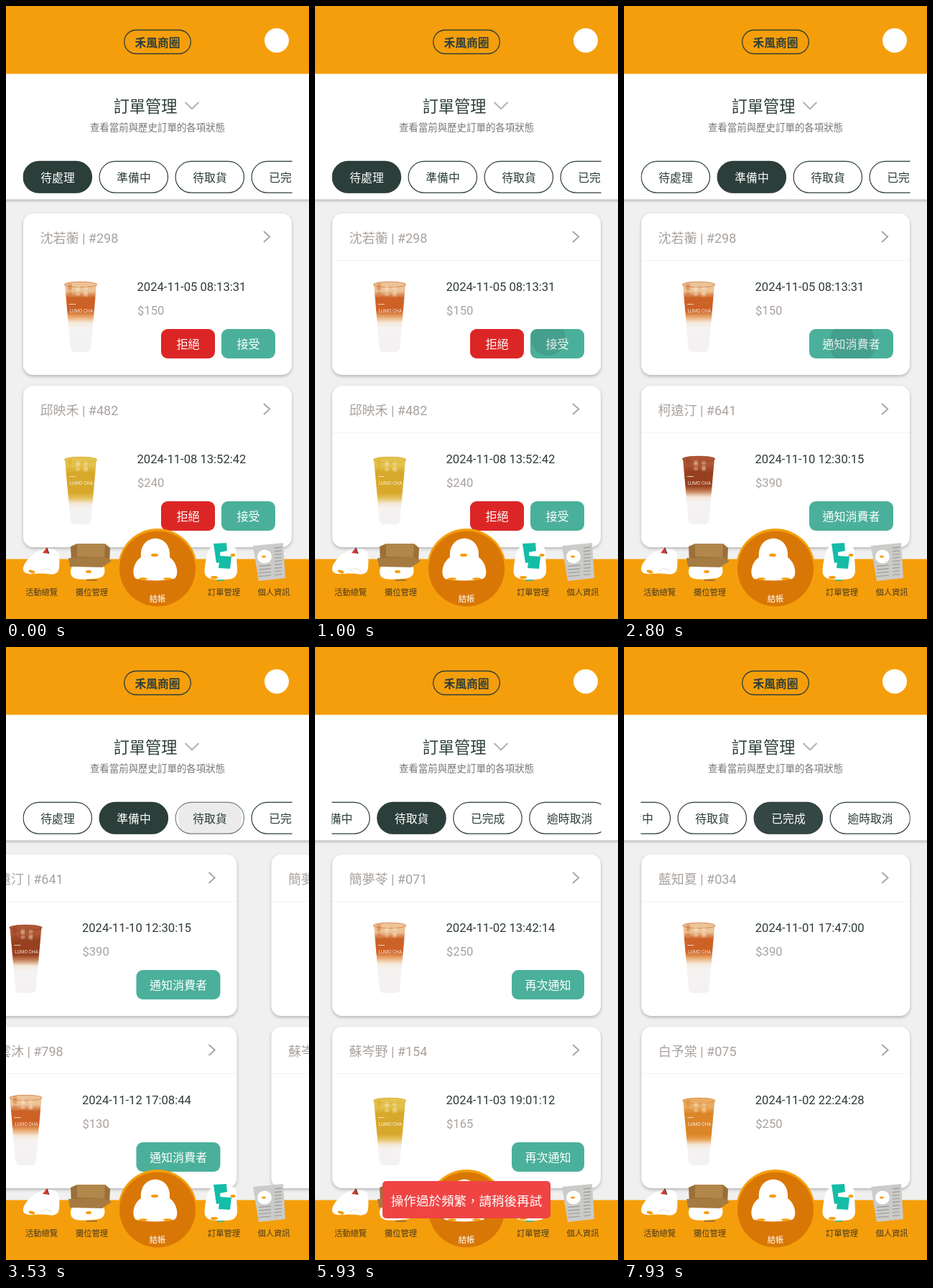
Write an HTML page with a canvas that moves like this. It is 422 px wide and 854 px high and loops after 8 s.

```html
<!DOCTYPE html>
<html lang="zh-Hant">
<head>
<meta charset="utf-8">
<title>訂單管理</title>
<style>
html, body { margin: 0; width: 100%; height: 100%; overflow: hidden; background: #f0f0f0; }
canvas { display: block; width: 422px; height: 854px; }
</style>
</head>
<body>
<canvas id="stage" width="422" height="854"></canvas>
<script>
const ctx = document.getElementById('stage').getContext('2d');
const W = 422, H = 854, LOOP = 8000;
const FONT = 'Roboto, "Noto Sans CJK TC", "Noto Sans CJK JP", "Noto Sans CJK", sans-serif';
const AMBER = '#f59e0b', DEEP = '#d97706', DARK = '#2b3e3a', GREY = '#a8a29e', TEAL = '#4bb09b', RED = '#dc2626';

const TEA = { ice: '#ecc397', tea: '#cd6226', blend: '#e9a468', rim: 388, level: .4 };
const CITRUS = { ice: '#e2c24c', tea: '#d8a82b', blend: '#e4c05a', rim: 392, level: .52 };
const BLACK = { ice: '#ad5636', tea: '#97401f', blend: '#c57f55', rim: 391, level: .42 };
const HONEY = { ice: '#e8ab62', tea: '#db8529', blend: '#e69d4c', rim: 392, level: .52 };

const pages = [
  { swapAt: 1200, buttons: [[216, 75, '拒絕', RED], [300, 75, '接受', TEAL]], cards: [
    ['沈若蘅', '298', '2024-11-05 08:13:31', 150, TEA],
    ['邱映禾', '482', '2024-11-08 13:52:42', 240, CITRUS],
    ['溫岱川', '517', '2024-11-09 10:21:05', 180, HONEY]] },
  { swapAt: 2930, buttons: [[258, 117, '通知消費者', TEAL]], cards: [
    ['沈若蘅', '298', '2024-11-05 08:13:31', 150, TEA],
    ['柯遠汀', '641', '2024-11-10 12:30:15', 390, BLACK],
    ['紀雲沐', '798', '2024-11-12 17:08:44', 130, TEA]] },
  { swapAt: LOOP, buttons: [[274, 101, '再次通知', TEAL]], cards: [
    ['簡夢苓', '071', '2024-11-02 13:42:14', 250, TEA],
    ['蘇岑野', '154', '2024-11-03 19:01:12', 165, CITRUS]] },
  { swapAt: LOOP, buttons: [], cards: [
    ['藍知夏', '034', '2024-11-01 17:47:00', 390, TEA],
    ['白予棠', '075', '2024-11-02 22:24:28', 250, HONEY]] }
];
const taps = [[0, 930, 325, 463], [1, 2690, 318, 470], [2, 4580, 326, 470]];
const slideStarts = [1720, 3494, 7690];
const tabs = [[24, 96, '待處理'], [130, 96, '準備中'], [236, 96, '待取貨'], [342, 96, '已完成'], [448, 112, '逾時取消']];

const clamp = v => Math.max(0, Math.min(1, v));
const ramp = (t, from, to) => clamp((t - from) / (to - from));

// Cubic bezier (.25, .1, .25, 1)
function ease(x) {
  if (x <= 0 || x >= 1) return clamp(x);
  let lo = 0, hi = 1, s = .5;
  for (let i = 0; i < 20; i++) {
    s = (lo + hi) / 2;
    if (.75 * s * (1 - s) + s ** 3 < x) lo = s; else hi = s;
  }
  return .3 * s * (1 - s) ** 2 + 3 * s * s * (1 - s) + s ** 3;
}

function text(str, x, cy, size, color, align = 'left', weight = 400) {
  ctx.font = `${weight} ${size}px ${FONT}`;
  ctx.textAlign = align;
  ctx.fillStyle = color;
  ctx.fillText(str, x, cy + size * .37);
}

function rounded(x, y, w, h, r) {
  ctx.beginPath();
  ctx.roundRect(x, y, w, h, r);
}

function box(x, y, w, h, r, color) {
  rounded(x, y, w, h, r);
  ctx.fillStyle = color;
  ctx.fill();
}

function oval(x, y, rx, ry, color, turn = 0) {
  ctx.beginPath();
  ctx.ellipse(x, y, rx, ry, turn, 0, Math.PI * 2);
  ctx.fillStyle = color;
  ctx.fill();
}

function shape(color, ...points) {
  ctx.beginPath();
  points.forEach(([x, y]) => ctx.lineTo(x, y));
  ctx.fillStyle = color;
  ctx.fill();
}

// Closed outline that rounds every corner
function blob(color, ...points) {
  const mid = ([a, b], [c, d]) => [(a + c) / 2, (b + d) / 2];
  ctx.beginPath();
  ctx.moveTo(...mid(points[points.length - 1], points[0]));
  points.forEach((p, i) => ctx.quadraticCurveTo(...p, ...mid(p, points[(i + 1) % points.length])));
  ctx.fillStyle = color;
  ctx.fill();
}

function line(color, width, ...points) {
  ctx.beginPath();
  points.forEach(([x, y]) => ctx.lineTo(x, y));
  ctx.strokeStyle = color;
  ctx.lineWidth = width;
  ctx.stroke();
}

function shadow(color, blur, dy) {
  ctx.shadowColor = color;
  ctx.shadowBlur = blur;
  ctx.shadowOffsetY = dy;
}

function cup({ ice, tea, blend, rim, level }, y) {
  ctx.save();
  ctx.translate(0, y);
  const top = rim - 289, base = 192;
  const fill = ctx.createLinearGradient(0, top, 0, base);
  [[0, ice], [.1, ice], [.2, tea], [level, tea], [level + .08, blend], [level + .17, '#f5e8da'], [level + .25, '#f5f3f2'], [1, '#f3f1f1']]
    .forEach(stop => fill.addColorStop(...stop));
  shape(fill, [82, top], [126, top], [118, base - 2], [114, base + 1], [94, base + 1], [90, base - 2]);
  oval(104, top, 23, 4, ice);
  ctx.beginPath();
  ctx.ellipse(104, top, 22.5, 3.8, 0, 0, Math.PI * 2);
  ctx.strokeStyle = tea;
  ctx.lineWidth = .6;
  ctx.stroke();
  ctx.globalAlpha = .3;
  for (let i = 0; i < 10; i++) {
    box(86 + (i * 11) % 33, top - 2 + (i * 7) % 15, 6, 5, 2, i % 3 ? '#fff3dc' : tea);
  }
  ctx.globalAlpha = .85;
  box(88, 126, 9, 1, 0, '#f8e6d6');
  text('LUMO CHA', 105, 136, 6.5, '#fff', 'center');
  ctx.restore();
}

function button([x, w, label, color], y) {
  box(x, y, w, 41, 9, color);
  text(label, x + w / 2, y + 21, 16, '#fff', 'center');
}

function card([name, id, date, price, drink], y, buttons, t) {
  ctx.save();
  shadow('rgba(0,0,0,.25)', 4, 2);
  box(24, y, 374, 225, 14, '#fff');
  ctx.restore();
  if (t > 300) box(24, y + 65, 374, 1, 0, '#f2f2f2');
  text(`${name} | #${id}`, 47.5, y + 34, 18, GREY);
  line(GREY, 1.8, [359, y + 25], [367.3, y + 32.5], [359, y + 40]);
  cup(drink, y);
  text(date, 182.5, y + 102, 16.6, '#2f3b39');
  text('$' + price, 183, y + 135, 16.6, GREY);
  buttons.forEach(b => button(b, y + 161));
}

function ripple(start, x, y, t) {
  const dt = t - start;
  if (dt < 0 || dt > 450) return;
  const r = 10 + 38 * ramp(dt, 0, 190);
  ctx.globalAlpha = .09 * (1 - ramp(dt, 220, 450));
  oval(x, y, r, r, '#000');
  ctx.globalAlpha = 1;
}

function drawPage(index, t) {
  const { cards, buttons, swapAt } = pages[index];
  const first = t >= swapAt ? 1 : 0;
  card(cards[first], 289, buttons, t);
  card(cards[first + 1], 529, buttons, t);
  taps.filter(tap => tap[0] === index).forEach(([, start, x, y]) => {
    const [bx, bw] = buttons[buttons.length - 1];
    ctx.save();
    rounded(bx, 450, bw, 41, 9);
    ctx.clip();
    ripple(start, x, y, t);
    ctx.restore();
  });
}

function drawTabs(t) {
  const scroll = 161 * (1 - (1 - ramp(t, 5700, 6180)) ** 4);
  ctx.save();
  ctx.beginPath();
  ctx.rect(23.4, 212, 375.2, 52);
  ctx.clip();
  ctx.translate(-scroll, 0);
  tabs.forEach(([x, w, label], i) => {
    const enter = i ? slideStarts[i - 1] ?? LOOP : -1000;
    const leave = slideStarts[i] ?? LOOP;
    const on = ramp(t, enter + 130, enter + 247) * (1 - ramp(t, leave + 100, leave + 190));
    const pressed = t > enter - 30 && t < enter + 130;
    rounded(x + .1, 216.4, w - .6, 43.8, 22);
    ctx.fillStyle = '#fff';
    ctx.fill();
    if (pressed) {
      ctx.save();
      ctx.clip();
      const r = 44 * ramp(t, enter - 30, enter + 35);
      oval(x + w / 2, 238, r, r, '#ebebeb');
      ctx.restore();
    }
    rounded(x + .1, 216.4, w - .6, 43.8, 22);
    ctx.globalAlpha = on;
    ctx.fillStyle = DARK;
    ctx.fill();
    ctx.globalAlpha = pressed ? .65 : on > 0 && on < 1 ? on : 1;
    ctx.strokeStyle = DARK;
    ctx.lineWidth = 1.2;
    ctx.stroke();
    ctx.globalAlpha = 1;
    text(label, x + w / 2, 239, 15.8, on > .35 ? '#fff' : DARK, 'center');
  });
  ctx.restore();
}

function drawHeader(t) {
  ctx.save();
  shadow('rgba(0,0,0,.3)', 4, 1);
  box(-10, 94, W + 20, 175.5, 0, '#fff');
  ctx.restore();
  box(0, 0, W, 94.6, 0, AMBER);
  rounded(164.7, 33.5, 92.6, 33, 16.5);
  ctx.strokeStyle = DARK;
  ctx.lineWidth = 1.3;
  ctx.stroke();
  text('禾風商圈', 211, 51.5, 15.8, DARK, 'center', 700);
  oval(377, 48, 17, 17, '#fff');
  text('訂單管理', 194, 140, 22.2, DARK, 'center');
  line('#b3b3b3', 2, [249.5, 134], [259, 143.3], [268.5, 134]);
  text('查看當前與歷史訂單的各項狀態', 211, 169.5, 13.45, '#777', 'center');
  drawTabs(t);
}

function lyingBird() {
  blob('#fff', [23, 780], [36, 764], [50, 757], [72, 756], [75, 772], [73, 793], [50, 790], [25, 792]);
  shape('#cf3b2f', [51, 762], [57, 754], [60, 763]);
  line('#333', 1, [57, 755], [60, 763]);
  oval(36, 788, 4.5, 2, AMBER, .3);
  line('#e2ddd5', 1, [48, 787], [56, 783], [64, 787]);
}

function boxedBird() {
  blob('#fff', [90, 778], [114, 774], [137, 776], [138, 796], [114, 799], [90, 798]);
  shape('#9b7038', [90, 753], [99, 749], [138, 749], [145, 755], [144, 776], [91, 776]);
  shape('#b1874c', [99, 749], [138, 749], [137, 768], [99, 767]);
  shape('#a67b41', [87, 769], [138, 768], [147, 773], [134, 782], [89, 781]);
  oval(115, 788, 4, 2, AMBER);
  line('#8f6735', 1.5, [112, 800], [127, 800]);
}

function mainBird() {
  ctx.beginPath();
  ctx.moveTo(188, 768);
  ctx.bezierCurveTo(185, 733, 231, 733, 228, 768);
  ctx.bezierCurveTo(240, 777, 241, 795, 234, 798);
  ctx.quadraticCurveTo(208, 803, 181, 798);
  ctx.bezierCurveTo(174, 791, 178, 774, 188, 768);
  ctx.fillStyle = '#fff';
  ctx.fill();
  oval(207, 765, 5, 2.2, AMBER);
  oval(191, 798, 6, 1.8, AMBER);
  oval(225, 798, 6, 1.8, AMBER);
}

function readingBird() {
  blob('#fff', [283, 752], [303, 750], [321, 752], [321, 770], [323, 797], [300, 800], [276, 797], [277, 776]);
  shape('#14bda6', [289, 749], [307, 748], [308, 759], [298, 761], [299, 775], [293, 776]);
  shape('#14bda6', [298, 766], [314, 767], [312, 784], [296, 783]);
  oval(316, 765, 3.5, 2, AMBER);
  oval(290, 796, 5, 2, AMBER);
  line('#14bda6', 1.5, [294, 800], [304, 800]);
}

function newspaper() {
  shape('#cbcbc9', [344, 752], [386, 748], [389, 797], [352, 801]);
  for (let i = 0; i < 9; i++) {
    const y = 755 + i * 4.7;
    line('#a0a09e', 1.4, [374, y], [384, y - 1]);
    if (i > 4) line('#a0a09e', 1.4, [352, y + 2], [369, y + .5]);
  }
  oval(360, 767, 10, 9.5, '#fff');
  oval(359, 767, 3, 1.5, AMBER);
}

function drawNav() {
  box(0, 770.4, W, 84, 0, AMBER);
  oval(211, 783, 55, 55, AMBER);
  oval(211, 784, 53, 52.5, DEEP);
  [lyingBird, boxedBird, mainBird, readingBird, newspaper].forEach(icon => icon());
  [[49.5, '活動總覽'], [119.5, '攤位管理'], [303.5, '訂單管理'], [373, '個人資訊']]
    .forEach(([x, label]) => text(label, x, 816.5, 11.3, '#4a3b1f', 'center'));
  text('結帳', 211, 826, 11.3, '#fff', 'center');
}

function drawToast(t) {
  const alpha = ramp(t, 5170, 5440) * (1 - ramp(t, 6440, 6720));
  if (!alpha) return;
  ctx.globalAlpha = alpha;
  box(94, 744, 234, 52, 5, '#ef4444');
  text('操作過於頻繁，請稍後再試', 211, 772, 17.55, '#fff', 'center');
  ctx.globalAlpha = 1;
}

function draw(now) {
  const t = now % LOOP;
  box(0, 0, W, H, 0, '#f0f0f0');
  const position = slideStarts.reduce((sum, start) => sum + ease((t - start) / 250), 0);
  pages.forEach((page, i) => {
    const offset = (i - position) * W;
    if (Math.abs(offset) >= W) return;
    ctx.save();
    ctx.translate(offset, 0);
    drawPage(i, t);
    ctx.restore();
  });
  drawHeader(t);
  drawNav();
  drawToast(t);
}

const began = performance.now();
function tick() {
  draw(performance.now() - began);
  requestAnimationFrame(tick);
}
tick();
</script>
</body>
</html>
```
